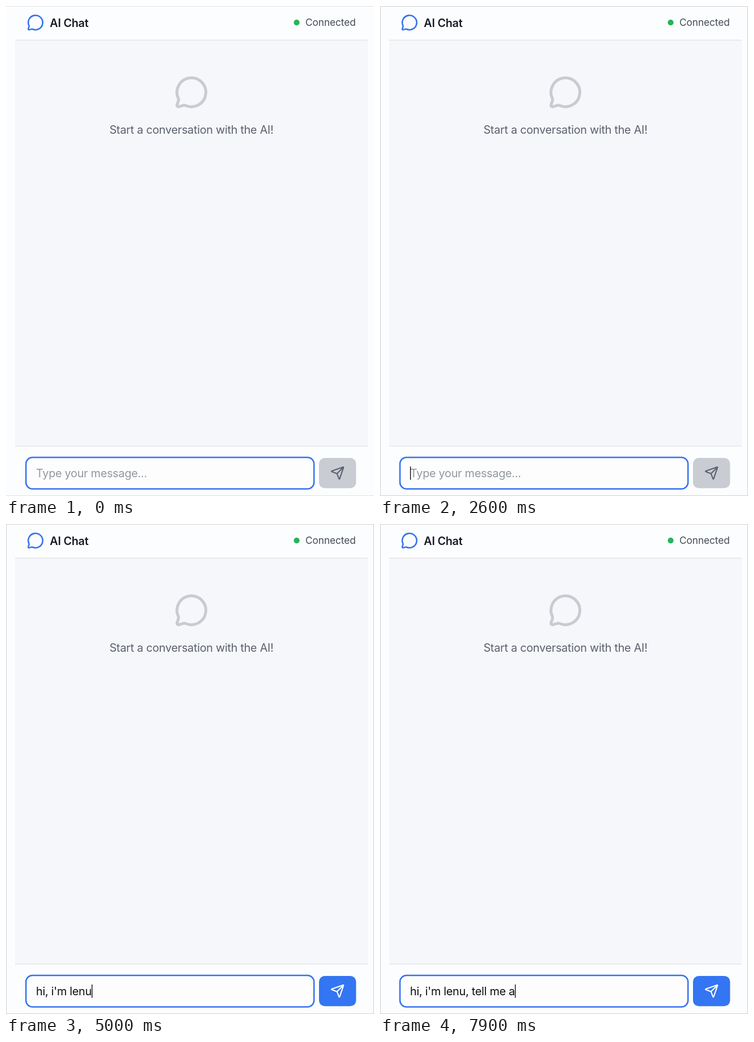
Write an HTML page with a canvas that moves like this. It is 649x863 px and loops after 8 s.

```html
<!DOCTYPE html>
<html lang="en">
<head>
<meta charset="utf-8">
<title>AI Chat</title>
<style>
  html, body { margin: 0; width: 100%; height: 100%; overflow: hidden; background: #fcfdfe; }
  canvas { display: block; width: 649px; height: 863px; }
</style>
</head>
<body>
<canvas id="stage"></canvas>
<script>
const W = 649, H = 863, LOOP = 8000;
const BLUE = '#3473ee', INK = '#0c0d10';
const canvas = document.getElementById('stage');
const ctx = canvas.getContext('2d');
const ratio = window.devicePixelRatio || 1;
canvas.width = W * ratio;
canvas.height = H * ratio;

const bubble = new Path2D('M2.992 16.342a2 2 0 0 1 .094 1.167l-1.065 3.29a1 1 0 0 0 1.236 1.168l3.413-.998a2 2 0 0 1 1.099.092 10 10 0 1 0-4.777-4.719');
const plane = new Path2D('M14.536 21.686a.5.5 0 0 0 .937-.024l6.5-19a.496.496 0 0 0-.635-.635l-19 6.5a.5.5 0 0 0-.024.937l7.93 3.18a2 2 0 0 1 1.112 1.11zM21.854 2.147l-10.94 10.939');
const arrow = new Path2D('M0 0V16.6L3.8 13.1L6.6 19.4L9.5 18.2L6.8 12H12Z');

const message = "hi, i'm lenu, tell me a";
const keyTimes = [2700, 2900, 3100, 3300, 3500, 3600, 3800, 3900, 4100, 4200, 4400, 4600,
                  5800, 6000, 6500, 6700, 6800, 6900, 7100, 7300, 7500, 7700, 7900];
const FOCUS = 400, ACTIVE = 800, ARRIVE = 1300, HIDE = 2600;

const clamp = v => Math.max(0, Math.min(1, v));
const easeOut = p => 1 - (1 - p) ** 3;
const mix = (a, b, p) => a + (b - a) * p;
const mixRgb = (a, b, p) => `rgb(${a.map((v, i) => Math.round(mix(v, b[i], p))).join(',')})`;

function rect(x, y, w, h, color) {
  ctx.fillStyle = color;
  ctx.fillRect(x, y, w, h);
}

function roundRect(x, y, w, h, r) {
  ctx.beginPath();
  ctx.roundRect(x, y, w, h, r);
}

function setFont(size, weight = 400, tracking = -0.013) {
  ctx.font = `${weight} ${size}px Inter, sans-serif`;
  ctx.letterSpacing = `${size * tracking}px`;
}

function text(str, x, y, color, align = 'left') {
  ctx.textAlign = align;
  ctx.fillStyle = color;
  ctx.fillText(str, x, y);
}

// Strokes a 24-unit icon around its centre.
function icon(path, x, y, unit, color) {
  ctx.save();
  ctx.translate(x, y);
  ctx.scale(unit, unit);
  ctx.translate(-12, -12);
  ctx.lineWidth = 2;
  ctx.lineCap = ctx.lineJoin = 'round';
  ctx.strokeStyle = color;
  ctx.stroke(path);
  ctx.restore();
}

function drawPage(active) {
  rect(0, 0, W, H, '#fcfdfe');
  rect(16, 60, 622, 715, '#f6f7fb');
  rect(16, 59.5, 622, 1.3, '#e1e3e7');
  rect(16, 774.5, 622, 1.3, '#e1e3e7');

  icon(bubble, 52, 29.2, 1.273, BLUE);
  setFont(19.8, 600);
  text('AI Chat', 77.3, 36.6, '#161b26');
  ctx.beginPath();
  ctx.arc(512.6, 29.2, 5.1, 0, Math.PI * 2);
  ctx.fillStyle = '#22b658';
  ctx.fill();
  setFont(17.3, 400, -0.005);
  text('Connected', 528, 35.4, '#444b57');

  icon(bubble, 327, 152, 2.545, '#c9cbd0');
  setFont(19.8);
  text('Start a conversation with the AI!', 327, 224.8, '#5a606d', 'center');

  if (active) {
    ctx.strokeStyle = '#cfd0d2';
    ctx.lineWidth = 1;
    ctx.strokeRect(0.5, 0.5, W - 1, H - 1);
  } else {
    rect(0, 0, W, 1, '#dfe0e2');
    rect(0, H - 1, W, 1, '#dfe0e2');
  }
}

function caretOn(t, count) {
  if (t < FOCUS) return false;
  const since = t - (count ? keyTimes[count - 1] : FOCUS);
  return since % 1000 < 500 || (count > 12 && since <= 500);
}

function drawInput(t) {
  const count = keyTimes.filter(k => k <= t).length;
  const typed = message.slice(0, count);

  roundRect(35.2, 795, 508, 55.6, 11.5);
  ctx.fillStyle = '#fdfdfe';
  ctx.fill();
  ctx.strokeStyle = BLUE;
  ctx.lineWidth = 2.5;
  ctx.stroke();

  setFont(19.8);
  text(typed || 'Type your message...', 53, 830.2, count ? INK : '#9297a1');
  if (caretOn(t, count)) {
    rect(53 + ctx.measureText(typed).width, 811, 1.4, 23.5, INK);
  }

  const on = clamp((t - keyTimes[0] + 50) / 150);
  roundRect(552, 796, 65.4, 53.2, 10);
  ctx.fillStyle = mixRgb([201, 204, 211], [52, 117, 243], on);
  ctx.fill();
  icon(plane, 584.7, 822.6, 1.061, mixRgb([91, 98, 112], [255, 255, 255], on));
}

function drawPointer(t) {
  if (t < ACTIVE || t >= HIDE) return;
  const p = easeOut(clamp((t - ACTIVE) / (ARRIVE - ACTIVE)));
  ctx.save();
  ctx.translate(mix(330, 231.3, p), mix(860, 735.6, p));
  ctx.shadowColor = 'rgba(0,0,0,.3)';
  ctx.shadowBlur = 3;
  ctx.shadowOffsetY = 1;
  ctx.lineJoin = 'round';
  ctx.lineWidth = 2.4;
  ctx.strokeStyle = '#fff';
  ctx.stroke(arrow);
  ctx.shadowColor = 'transparent';
  ctx.fillStyle = '#000';
  ctx.fill(arrow);
  ctx.restore();
}

const start = performance.now();
function frame() {
  const t = (performance.now() - start) % LOOP;
  ctx.setTransform(ratio, 0, 0, ratio, 0, 0);
  drawPage(t >= ACTIVE);
  drawInput(t);
  drawPointer(t);
  requestAnimationFrame(frame);
}
frame();
</script>
</body>
</html>
```
